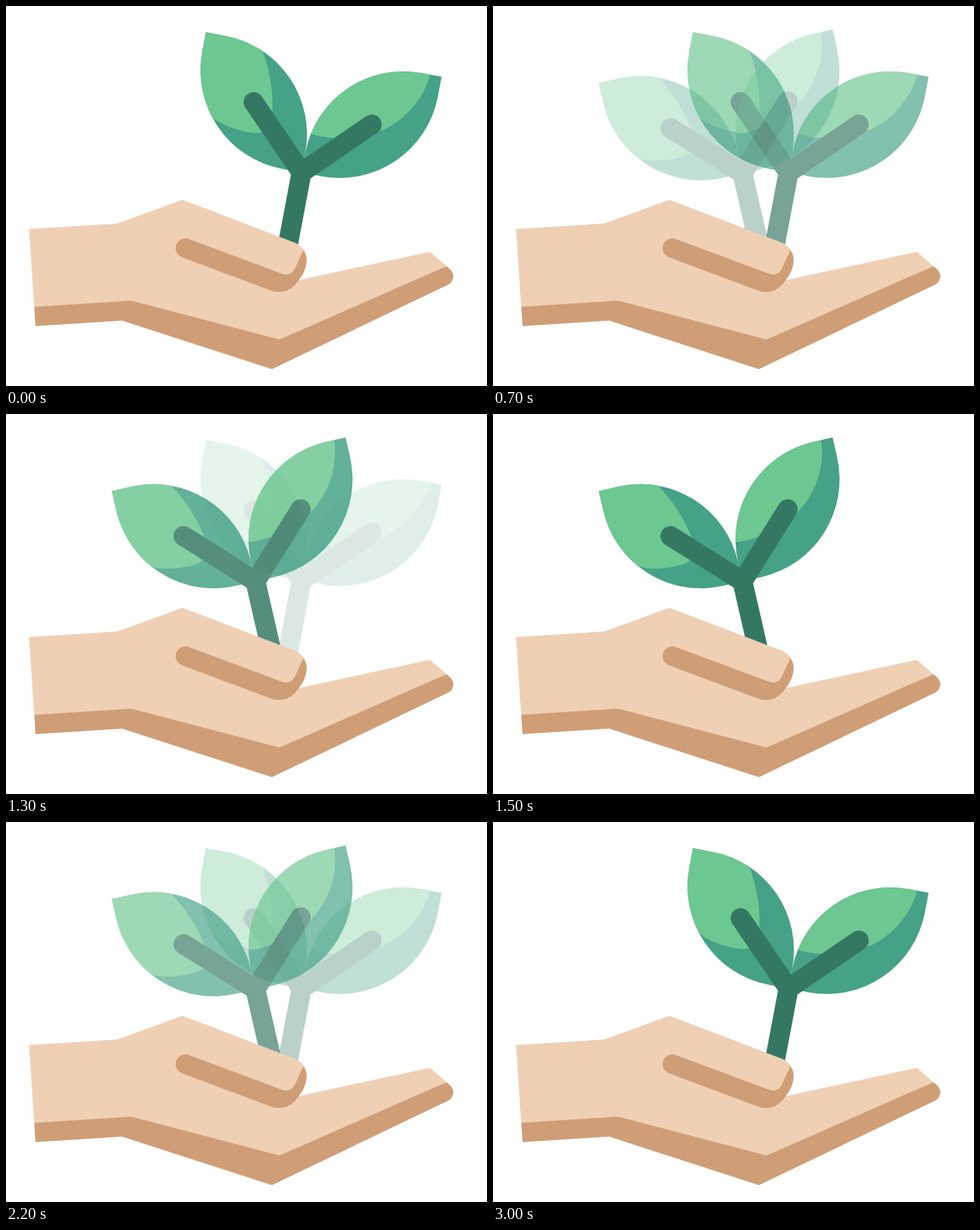
These frames come from a looping animation (700 px wide and 552 px high, 3.5 s). An HTML page:

```html
<!DOCTYPE html>
<html lang="en">
<head>
<meta charset="utf-8">
<title>Seedling in a hand</title>
<style>
  html, body { margin: 0; width: 100%; height: 100%; overflow: hidden; background: #fff; }
  svg { display: block; width: 100%; height: 100%; }
</style>
</head>
<body>
<svg viewBox="0 0 700 552">
  <defs>
    <!-- Upright seedling, origin at the tip of its left leaf -->
    <g id="plant">
      <path id="leaf" fill="#45a188" d="M0 0h29a145.5 145.5 0 0 1 145.5 145.5v29h-29A145.5 145.5 0 0 1 0 29z"/>
      <use href="#leaf" transform="translate(349) scale(-1 1)"/>
      <g fill="#6dc791">
        <path d="M0 0H29A145.5 145.5 0 0 1 85.6 11.3C102 38 113 68 116.5 97C118 118 112 130 94 131.2C72 132 50 129 32.4 120.5A145.5 145.5 0 0 1 0 29z"/>
        <path d="M332 0C329 37 309 72 276 94C250 111 215 120 177.3 117A145.5 145.5 0 0 1 320 0z"/>
      </g>
      <path fill="none" stroke="#347863" stroke-width="29" stroke-linecap="round" d="M87 87L174.5 174.5L262 87M174.5 174.5V300"/>
    </g>
  </defs>

  <use id="right" href="#plant" transform="translate(291 38) rotate(10.7)"/>
  <use id="left" href="#plant" transform="translate(154 112) rotate(-12.9)"/>

  <g fill="#cf9e76">
    <path d="M41 435L182 426L398 480L641 378Q650 384 651 392Q651 401 643 405L387 527.5L169 457L43 465z"/>
    <path fill="#efd0b4" d="M33.5 324L162 316L257 281.5L422 344.5Q429 348 433 354.5L437 370L427 398L617 357L641 378L398 484.5L182 428L41 437z"/>
    <path d="M266 338.5L402 389Q414 393 420 382L433 354.5Q438 362 437.5 371C436 385 431 392 426 398Q411 421 386 413.5L256 365A14 14 0 0 1 266 338.5z"/>
  </g>
</svg>
<script>
  const right = document.getElementById('right');
  const left = document.getElementById('left');
  const clamp = n => Math.min(6, Math.max(0, n));

  // Cross-fade in six hard steps of 200 ms, with rests at both ends
  function draw() {
    const t = performance.now() % 3500;
    const step = t < 2000
      ? clamp(Math.floor((t - 300) / 200))
      : clamp(6 - Math.floor((t - 1800) / 200));
    left.setAttribute('opacity', step / 6);
    right.setAttribute('opacity', 1 - step / 6);
    requestAnimationFrame(draw);
  }
  draw();
</script>
</body>
</html>
```
